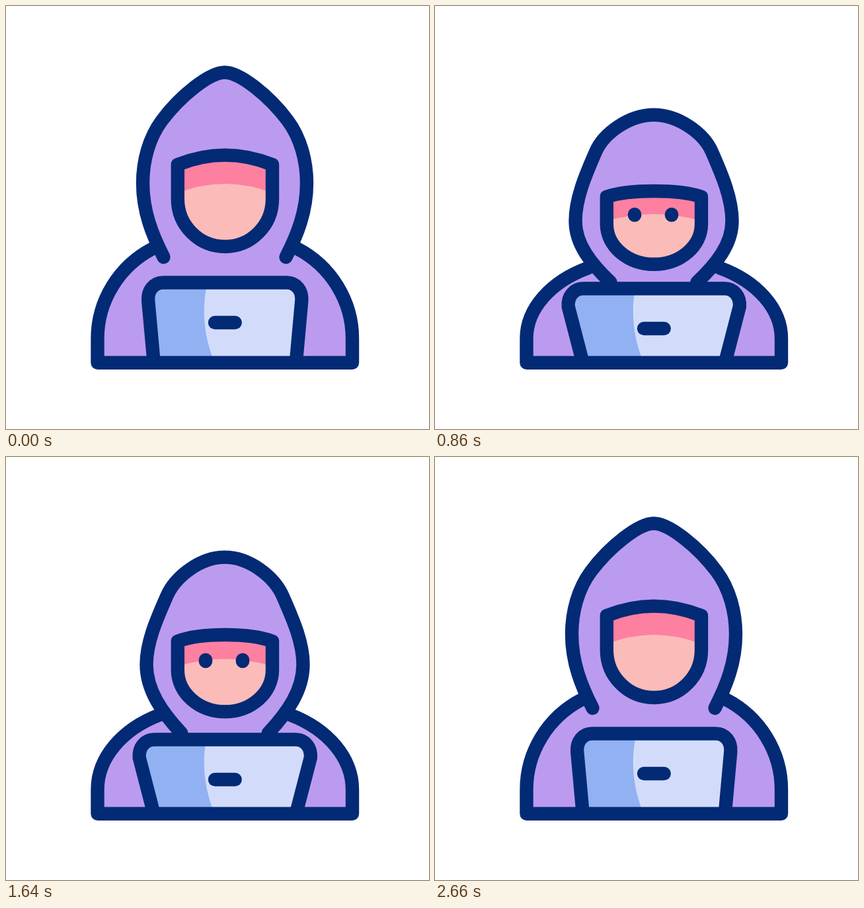
An HTML page with a canvas for the animation above (3000 ms loop, 640x640 px).

```html
<!DOCTYPE html>
<html lang="en">
<head>
<meta charset="utf-8">
<title>Hooded figure</title>
<style>
html, body { margin: 0; width: 100%; height: 100%; overflow: hidden; background: #fff; }
canvas { display: block; width: 640px; height: 640px; }
</style>
</head>
<body>
<canvas width="640" height="640"></canvas>
<script>
const LOOP = 3000, BASE = 539.7, STROKE = 20.4;
const NAVY = '#032a75', PURPLE = '#bb9bf0', PINK = '#fd80a1', PEACH = '#fbbcb9';
const SKY = '#d2dcfa', BLUE = '#92b1f2';
const ctx = document.querySelector('canvas').getContext('2d');

const smooth = x => x * x * (3 - 2 * x);
const ramp = (t, from, to) => smooth(Math.min(1, Math.max(0, (t - from) / (to - from))));

// Two bobs of 600 ms while crouched.
const bobAt = t => t < 800 || t > 2000 ? 0
  : smooth(1 - Math.abs((t - 800) % 600 / 300 - 1));

// Traces cubic points for the left half, then their mirror image.
function symmetric(half, axis) {
  const mirrored = half.slice(0, -1).reverse().map(([x, y]) => [axis - x, y]);
  const points = [...half, ...mirrored];
  const path = new Path2D();
  path.moveTo(...points[0]);
  for (let i = 1; i < points.length; i += 3)
    path.bezierCurveTo(...points[i], ...points[i + 1], ...points[i + 2]);
  return path;
}

function fill(path, color) {
  ctx.fillStyle = color;
  ctx.fill(path);
}

function inside(path, draw) {
  ctx.save();
  ctx.clip(path);
  draw();
  ctx.restore();
}

function bar(x1, y1, x2, y2, width) {
  ctx.lineWidth = width;
  ctx.beginPath();
  ctx.moveTo(x1, y1);
  ctx.lineTo(x2, y2);
  ctx.stroke();
  ctx.lineWidth = STROKE;
}

// crouch moves the whole pose; head is the same with the bob taken off.
function drawJacket(crouch, head) {
  const left = 138.5, right = 524, armY = 503;
  const neckX = 222 + 10 * crouch, neckY = 367 + 30 * head;
  const w = neckX - left, h = armY - neckY;
  const path = new Path2D();
  path.moveTo(neckX, neckY);
  path.bezierCurveTo(left + 0.39 * w, armY - 0.805 * h, left, armY - 0.42 * h, left, armY);
  path.lineTo(left, BASE);
  path.lineTo(right, BASE);
  path.lineTo(right, armY);
  path.bezierCurveTo(right, armY - 0.42 * h, right - 0.39 * w, armY - 0.805 * h, right - w, neckY);
  fill(path, PURPLE);
  ctx.stroke(path);
}

function drawHood(crouch, head) {
  const axis = 662;
  const endX = 238.5 + 27 * crouch, endY = 380 + 38 * crouch;
  const sideX = 207 + 5.5 * crouch, sideY = 268 + 59 * head;
  const kneeX = 236 + 7 * crouch, kneeY = 173 + 49 * head;
  const top = 100.5 + 66 * head;
  const lean = 0.75 - 0.32 * crouch, round = 23.5 + 14 * crouch;
  const low = endY - sideY, mid = 0.28 * (sideY - kneeY), high = 0.5 * (kneeY - top);
  const path = symmetric([
    [endX, endY],
    [endX - 0.55 * (endX - sideX), endY - 0.3 * low], [sideX, sideY + 0.38 * low],
    [sideX, sideY],
    [sideX, sideY - 1.25 * mid], [kneeX - lean * mid, kneeY + mid],
    [kneeX, kneeY],
    [kneeX + lean * high, kneeY - high], [axis / 2 - round, top],
    [axis / 2, top]
  ], axis);
  fill(path, PURPLE);
  ctx.stroke(path);
}

function drawFace(crouch, head, eyeSize) {
  const left = 259.8, right = 403, mid = (left + right) / 2;
  const corner = 240 + 50 * head, brow = 220.7 + 58 * head, inset = 48 - 14 * crouch;
  const cheek = 292 + 39 * head, chin = 364 + 27.5 * head;
  const radius = mid - left, k = 0.5523;
  const path = new Path2D();
  path.moveTo(left, corner);
  path.bezierCurveTo(left + inset, brow, right - inset, brow, right, corner);
  path.lineTo(right, cheek);
  path.bezierCurveTo(right, cheek + k * (chin - cheek), mid + k * radius, chin, mid, chin);
  path.bezierCurveTo(mid - k * radius, chin, left, cheek + k * (chin - cheek), left, cheek);
  path.closePath();

  fill(path, PINK);
  inside(path, () => {
    const shade = 283 + 43.5 * head;
    const skin = new Path2D();
    skin.moveTo(left, shade);
    skin.quadraticCurveTo(mid, 255 + 50.5 * head, right, shade);
    skin.lineTo(right, chin);
    skin.lineTo(left, chin);
    fill(skin, PEACH);

    if (eyeSize > 0) {
      const y = 277 + 40 * head, half = (6 - 5 * head) * eyeSize / 2;
      for (const x of [302, 358]) bar(x, y - half, x, y + half, 20.6 * eyeSize);
    }
  });
  ctx.stroke(path);
}

function drawLaptop(crouch) {
  const axis = 662.5, dx = -13.5 * crouch, dy = 9 * crouch;
  const foot = 223.7, top = 418.5 + dy;
  const path = symmetric([
    [foot, BASE], [foot, BASE], [215.2 + dx, 446 + dy],
    [215.2 + dx, 446 + dy],
    [214 + dx, 431 + dy], [223 + dx, top],
    [238 + dx, top],
    [238 + dx, top], [axis / 2, top],
    [axis / 2, top]
  ], axis);
  path.closePath();

  fill(path, SKY);
  inside(path, () => {
    const shade = new Path2D();
    shade.moveTo(180, 418);
    shade.lineTo(305, 418);
    shade.bezierCurveTo(296, 455, 298, 497, 315.5, BASE);
    shade.lineTo(180, BASE);
    fill(shade, BLUE);
  });
  ctx.stroke(path);
  bar(316, top + 60.5, 346.7, top + 60.5, STROKE);
}

function draw(t) {
  const crouch = ramp(t, 200, 800) - ramp(t, 2000, 2600);
  const head = crouch - 0.25 * bobAt(t);
  const eyeSize = ramp(t, 600, 800) - ramp(t, 2400, 2660);

  ctx.fillStyle = '#fff';
  ctx.fillRect(0, 0, 640, 640);
  ctx.strokeStyle = NAVY;
  ctx.lineWidth = STROKE;
  ctx.lineCap = ctx.lineJoin = 'round';

  drawJacket(crouch, head);
  drawHood(crouch, head);
  drawFace(crouch, head, eyeSize);
  drawLaptop(crouch);
}

function tick() {
  draw(performance.now() % LOOP);
  requestAnimationFrame(tick);
}
tick();
</script>
</body>
</html>
```
